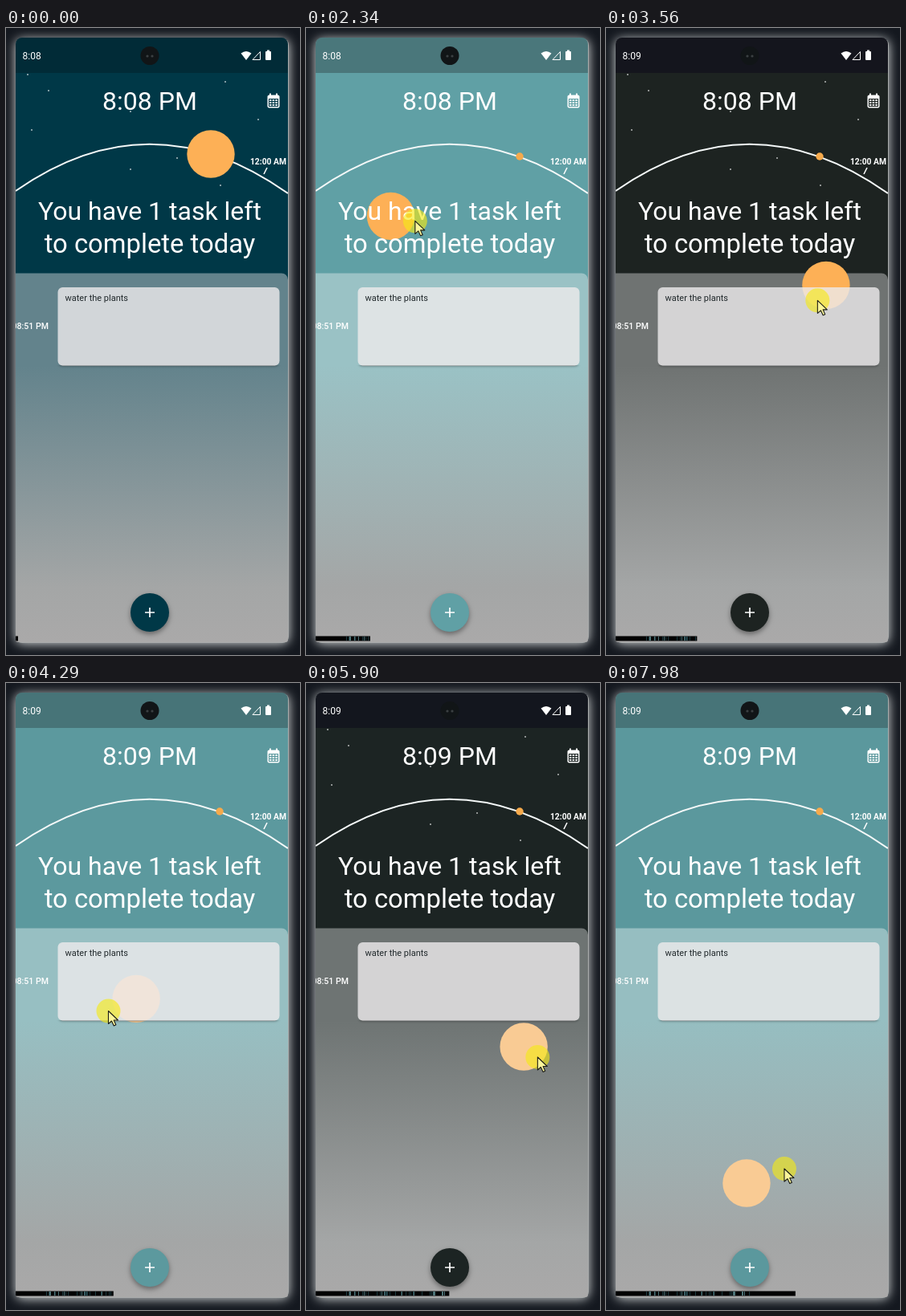
These frames come from a looping animation (366x781 px, 8000 ms). An HTML page with a canvas:

```html
<!DOCTYPE html>
<html lang="en">
<head>
<meta charset="utf-8">
<title>Day planner</title>
<style>
  html, body { margin: 0; width: 100%; height: 100%; overflow: hidden; background: #14181f; }
  canvas { display: block; width: 100vw; height: 100vh; }
</style>
</head>
<body>
<canvas id="stage" width="366" height="781"></canvas>
<script>
const LOOP = 8000, STEP = 67;
const ctx = document.getElementById('stage').getContext('2d');

// Keys: time, x, y
const pointerKeys = [
  [70, 316, 205], [500, 285, 180], [860, 258, 161], [1100, 240, 165], [1500, 150, 195],
  [1950, 95, 230], [2340, 135, 240], [2800, 235, 290], [3200, 290, 325], [3560, 262, 340],
  [4200, 140, 400], [4800, 85, 455], [5360, 160, 466], [5900, 289, 466], [6200, 300, 490],
  [6910, 150, 549], [7300, 95, 580], [7980, 222, 605]
];
const sunKeys = [
  [0, 255, 157], [900, 255, 157], [1150, 245, 160], [1500, 185, 180], [2000, 112, 220],
  [2340, 105, 234], [2800, 195, 275], [3250, 275, 312], [3560, 273, 321], [4200, 175, 385],
  [4900, 85, 448], [5360, 116, 468], [5900, 272, 453], [6200, 298, 478], [6910, 190, 549],
  [7400, 105, 590], [7980, 175, 623]
];
// The theme follows the sun's horizontal place
const themes = [
  { x: 105, sky: [96, 160, 165], bar: [74, 119, 123], list: [154, 194, 197] },
  { x: 190, sky: [90, 150, 155], bar: [70, 115, 119], list: [149, 189, 192] },
  { x: 255, sky: [0, 56, 71], bar: [1, 43, 55], list: [99, 131, 140] },
  { x: 272, sky: [29, 35, 33], bar: [20, 21, 29], list: [111, 115, 114] }
];
const stars = [[27, 58], [53, 78], [273, 67], [314, 114], [32, 127], [213, 162],
               [155, 176], [267, 196], [155, 104], [93, 160]];

const clamp = (v, lo = 0, hi = 1) => Math.min(hi, Math.max(lo, v));
const rgb = c => `rgb(${c.map(Math.round).join()})`;

// Cubic Hermite path with finite-difference tangents
function along(keys, t) {
  t = clamp(t, keys[0][0], keys.at(-1)[0]);
  let i = 0;
  while (i < keys.length - 2 && t > keys[i + 1][0]) i++;
  const a = keys[i], b = keys[i + 1], span = b[0] - a[0], u = (t - a[0]) / span;
  const slope = (k, axis) => {
    const p = keys[k - 1], n = keys[k + 1];
    return p && n ? (n[axis] - p[axis]) / (n[0] - p[0]) * span : 0;
  };
  return [1, 2].map(axis => {
    const still = a[axis] === b[axis];
    const m0 = still ? 0 : slope(i, axis), m1 = still ? 0 : slope(i + 1, axis);
    return (2 * u ** 3 - 3 * u * u + 1) * a[axis] + (u ** 3 - 2 * u * u + u) * m0
         + (3 * u * u - 2 * u ** 3) * b[axis] + (u ** 3 - u * u) * m1;
  });
}

function themeAt(x) {
  x = clamp(x, themes[0].x, themes.at(-1).x);
  let i = 0;
  while (i < themes.length - 2 && x > themes[i + 1].x) i++;
  const a = themes[i], b = themes[i + 1], u = (x - a.x) / (b.x - a.x);
  const mix = name => rgb(a[name].map((v, k) => v + (b[name][k] - v) * u));
  return { sky: mix('sky'), bar: mix('bar'), list: mix('list') };
}

function disc(x, y, r, fill) {
  ctx.fillStyle = fill;
  ctx.beginPath();
  ctx.arc(x, y, r, 0, 7);
  ctx.fill();
}
function box(x, y, w, h, r, fill) {
  ctx.fillStyle = fill;
  ctx.beginPath();
  ctx.roundRect(x, y, w, h, r);
  ctx.fill();
}
function polygon(points, fill) {
  ctx.fillStyle = fill;
  ctx.beginPath();
  points.forEach(p => ctx.lineTo(...p));
  ctx.closePath();
  ctx.fill();
}
function stroke(color, width, path) {
  ctx.strokeStyle = color;
  ctx.lineWidth = width;
  ctx.beginPath();
  path();
  ctx.stroke();
}
function line(x1, y1, x2, y2, width) {
  stroke('#fff', width, () => { ctx.moveTo(x1, y1); ctx.lineTo(x2, y2); });
}
function label(text, x, y, size, align = 'left', fill = '#fff', weight = 400) {
  ctx.font = `${weight} ${size}px Roboto, sans-serif`;
  ctx.textAlign = align;
  ctx.fillStyle = fill;
  ctx.fillText(text, x, y);
}
function withShadow(color, blur, dy, draw) {
  ctx.save();
  Object.assign(ctx, { shadowColor: color, shadowBlur: blur, shadowOffsetY: dy });
  draw();
  ctx.restore();
}

function statusBar(theme, t) {
  ctx.fillStyle = theme.bar;
  ctx.fillRect(12, 12, 339, 44);
  label(t < 3200 ? '8:08' : '8:09', 20.5, 39, 12);
  disc(179, 34.5, 11.5, '#111517');
  disc(176, 35, 1.6, '#3b4042');
  disc(182, 35, 1.6, '#3b4042');
  ctx.fillStyle = '#fff';
  ctx.beginPath();
  ctx.moveTo(299, 40);
  ctx.lineTo(292.5, 31.5);
  ctx.quadraticCurveTo(299, 26.5, 305.5, 31.5);
  ctx.fill();
  stroke('#fff', 1, () => {
    ctx.moveTo(307, 39.5);
    ctx.lineTo(316.5, 39.5);
    ctx.lineTo(316.5, 29.5);
    ctx.closePath();
  });
  box(323, 29, 7, 11, 1, '#fff');
  box(325, 27.5, 3, 2, 0, '#fff');
}

function calendarIcon(theme) {
  box(325.5, 83.5, 15, 16, 2, '#fff');
  box(328, 81.5, 2, 3, 0, '#fff');
  box(336, 81.5, 2, 3, 0, '#fff');
  box(327, 88, 12, 10, 0, theme.sky);
  for (let i = 0; i < 9; i++) box(328 + i % 3 * 3.7, 89 + (i / 3 | 0) * 3, 2.4, 2, 0, '#fff');
}

function header(theme, sunX, t) {
  ctx.fillStyle = theme.sky;
  ctx.fillRect(12, 56, 339, 260);
  ctx.globalAlpha = clamp((sunX - 190) / 65) * 0.75;
  stars.forEach(([x, y]) => disc(x, y, 0.9, '#fff'));
  ctx.globalAlpha = 1;
  stroke('#f4f8f8', 2, () => {
    ctx.moveTo(12, 203);
    ctx.quadraticCurveTo(180, 85, 351, 206);
  });
  line(325, 174, 321, 182, 1.5);
  disc(266, 160, 4.7, '#f6aa4c');
  calendarIcon(theme);
}

function list(theme) {
  const shade = ctx.createLinearGradient(0, 306, 0, 765);
  shade.addColorStop(0, theme.list);
  shade.addColorStop(0.24, theme.list);
  shade.addColorStop(0.85, '#a4a6a6');
  shade.addColorStop(1, '#aaa9a9');
  // Dark lists fade evenly, so blend the middle back toward the top colour
  shade.addColorStop(0.25, theme.list);
  box(12, 305.5, 339, 460, [0, 8, 0, 0], shade);
}

function card() {
  ctx.save();
  ctx.beginPath();
  ctx.rect(0, 420, 366, 6);
  ctx.clip();
  withShadow('rgba(0,0,0,.35)', 3, 1, () => box(64.5, 323, 276, 97.5, 6, '#777'));
  ctx.restore();
  box(64.5, 323, 276, 97.5, 6, 'rgba(238,236,237,.8)');
  label('water the plants', 73.5, 340, 11, 'left', '#20282b');
  label('08:51 PM', 53, 375, 10.6, 'right', '#fff', 500);
}

function texts(t) {
  label(t < 4250 ? '8:08 PM' : '8:09 PM', 179, 102, 32, 'center');
  label('12:00 AM', 349, 170, 10.3, 'right', '#fff', 700);
  label('You have 1 task left', 179, 239, 32, 'center');
  label('to complete today', 179, 280, 32.8, 'center');
}

function addButton(theme) {
  withShadow('rgba(0,0,0,.4)', 6, 3, () => disc(179, 728, 24, theme.sky));
  line(173, 728, 185, 728, 1.7);
  line(179, 722, 179, 734, 1.7);
}

function bottomStrip(t) {
  const right = 15 + t * 0.0277;
  ctx.fillStyle = '#000';
  ctx.fillRect(12, 757.5, right - 12, 6);
  for (let x = 50; x < Math.min(right - 2, 180); x++) {
    const noise = Math.abs(Math.sin(x * 127.1) * 43758.5) % 1;
    if (noise > 0.3) continue;
    ctx.fillStyle = noise < 0.12 ? '#4d7377' : '#1d3b40';
    ctx.fillRect(x, 758, 1, 5);
  }
}

function pointer(x, y) {
  const arrow = [[0, 0], [0, 16], [4, 12.5], [6.8, 18.5], [9.4, 17.3], [6.8, 11.5], [12, 11.5]]
    .map(([dx, dy]) => [x + dx, y + dy]);
  disc(x, y, 15, 'rgba(245,235,20,.62)');
  polygon(arrow, '#fbf59a');
  ctx.lineJoin = 'round';
  stroke('#1b1c18', 1.1, () => {
    arrow.forEach(p => ctx.lineTo(...p));
    ctx.closePath();
  });
}

function draw(t) {
  const [sunX, sunY] = along(sunKeys, t);
  const theme = themeAt(sunX);

  ctx.fillStyle = '#14181f';
  ctx.fillRect(0, 0, 366, 781);
  withShadow('rgba(225,230,230,.95)', 14, 1, () => box(12, 13, 340, 753, 8, '#a9acac'));

  ctx.save();
  ctx.beginPath();
  ctx.roundRect(12, 12, 339, 753, [8, 8, 3, 3]);
  ctx.clip();
  statusBar(theme, t);
  header(theme, sunX, t);
  list(theme);
  disc(sunX, sunY, 29.7, sunY < 350 ? '#fdb056' : '#f9cb94');
  card();
  texts(t);
  addButton(theme);
  bottomStrip(t);
  if (t >= 70) pointer(...along(pointerKeys, t));
  ctx.restore();
}

function tick(now) {
  const t = now % LOOP;
  draw(Math.floor(t / STEP + 0.15) * STEP);
  requestAnimationFrame(tick);
}
requestAnimationFrame(tick);
</script>
</body>
</html>
```
